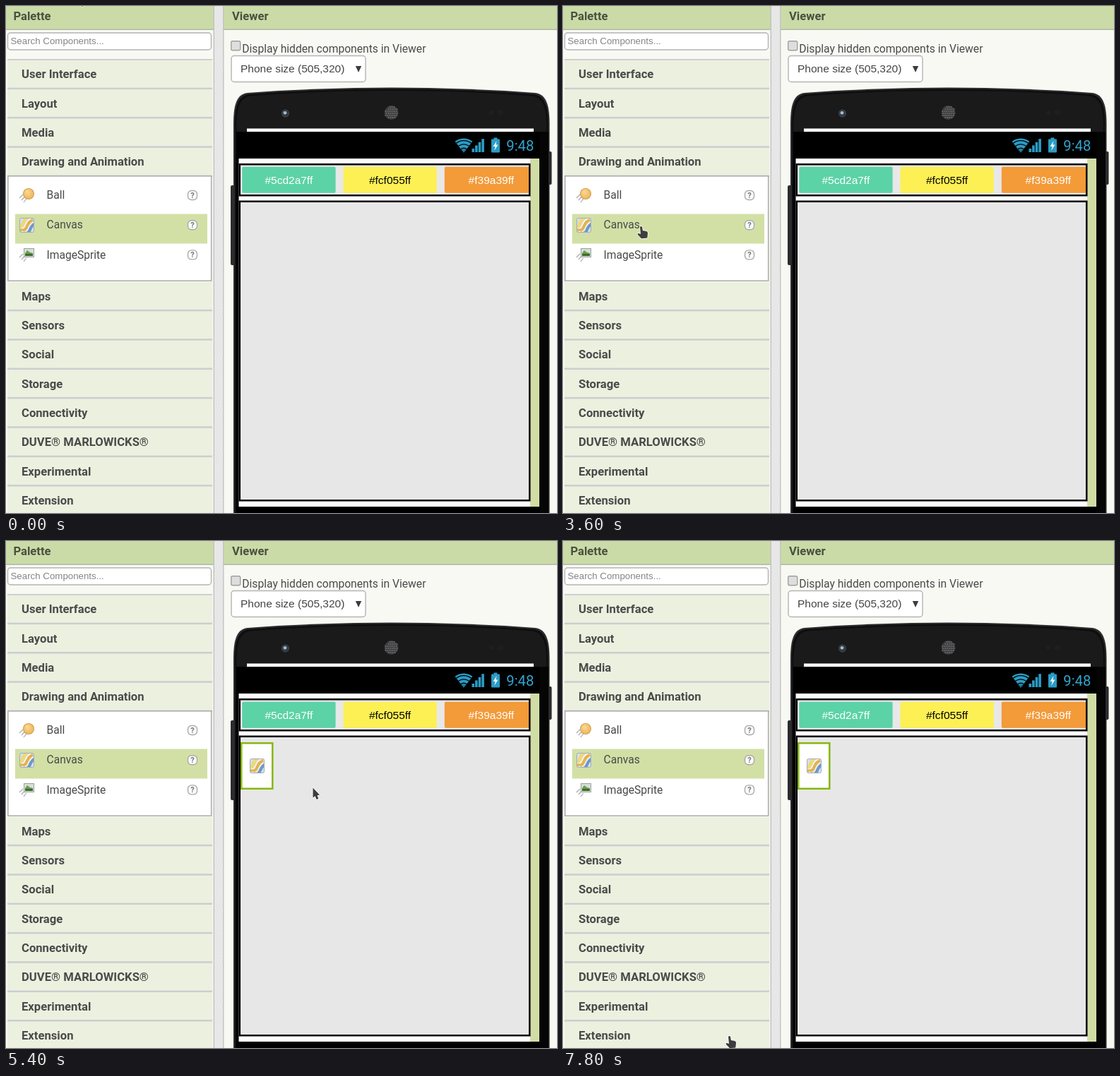
Recreate the animation shown at these times as an HTML page with a canvas. Size 780 px wide and 718 px high, loop 8000 ms.

```html
<!DOCTYPE html>
<html lang="en">
<head>
<meta charset="utf-8">
<title>Designer: adding a canvas</title>
<style>
html, body { margin: 0; width: 780px; height: 718px; overflow: hidden; background: #f8f9f3; }
canvas { display: block; }
</style>
</head>
<body>
<canvas id="stage" width="780" height="718"></canvas>
<script>
const W = 780, H = 718, LOOP = 8000;
const ROBOTO = 'Roboto, sans-serif', ARIAL = '"Liberation Sans", Arial, sans-serif';
const stage = document.getElementById('stage').getContext('2d');
const backdrop = document.createElement('canvas');
backdrop.width = W;
backdrop.height = H;
let g = backdrop.getContext('2d');

function rect(x, y, w, h, color) {
  g.fillStyle = color;
  g.fillRect(x, y, w, h);
}

// Box given by its outer edge, with the border drawn inside
function frame(x, y, w, h, line, border, fill) {
  rect(x, y, w, h, border);
  rect(x + line, y + line, w - 2 * line, h - 2 * line, fill);
}

function rounded(x, y, w, h, r, fill, border, line = 1) {
  g.beginPath();
  g.roundRect(x, y, w, h, r);
  g.fillStyle = fill;
  g.fill();
  if (border) {
    g.strokeStyle = border;
    g.lineWidth = line;
    g.stroke();
  }
}

function label(str, x, y, font, color, align = 'left') {
  g.font = font;
  g.fillStyle = color;
  g.textAlign = align;
  g.textBaseline = 'alphabetic';
  g.fillText(str, x, y);
}

function disc(x, y, r, color) {
  g.beginPath();
  g.arc(x, y, r, 0, Math.PI * 2);
  g.fillStyle = color;
  g.fill();
}

function poly(points, fill) {
  g.beginPath();
  points.forEach(([x, y]) => g.lineTo(x, y));
  g.closePath();
  g.fillStyle = fill;
  g.fill();
}

function line(x1, y1, x2, y2, color, width) {
  g.beginPath();
  g.moveTo(x1, y1);
  g.lineTo(x2, y2);
  g.strokeStyle = color;
  g.lineWidth = width;
  g.stroke();
}

function canvasIcon(x, y) {
  g.save();
  g.translate(x, y);
  g.beginPath();
  g.roundRect(0.5, 0.5, 20, 20, 2);
  g.fillStyle = '#d3dfec';
  g.fill();
  g.clip();
  const ribbon = (color, width, shift) => {
    g.beginPath();
    g.moveTo(-3 + shift, 13 + shift);
    g.bezierCurveTo(10 + shift, 16 + shift, 3 + shift, 3 + shift, 15 + shift, -1 + shift);
    g.strokeStyle = color;
    g.lineWidth = width;
    g.stroke();
  };
  ribbon('#f0d878', 5, -1);
  ribbon('#f7f7f4', 2, 2);
  ribbon('#e6b24c', 4, 4);
  ribbon('#f3efe2', 1.5, 6.2);
  ribbon('#6c97c9', 4, 8.5);
  g.restore();
  g.beginPath();
  g.roundRect(x + 0.5, y + 0.5, 20, 20, 2);
  g.strokeStyle = '#a3adb5';
  g.lineWidth = 1;
  g.stroke();
}

function speedLines(x, y) {
  for (let i = 0; i < 3; i++) line(x + i * 3, y + i * 3, x + 5 + i * 2.4, y - 5 + i * 3, '#aaa', 1.2);
}

function ballIcon() {
  speedLines(19, 272);
  const shade = g.createRadialGradient(30, 263, 1, 32, 266, 9);
  shade.addColorStop(0, '#fbd792');
  shade.addColorStop(1, '#ecb04f');
  disc(32, 266, 8, '#c99a50');
  disc(32, 266, 7.2, shade);
}

function spriteIcon() {
  speedLines(19, 356);
  frame(25, 343, 15, 13, 1, '#9aa29a', '#d5dfd8');
  poly([[27, 350], [30, 346], [34, 349], [38, 350], [38, 354], [27, 354]], '#6b9d4b');
  rect(27, 351, 11, 3, '#3f6a2c');
}

function helpIcon(y) {
  rounded(257.5, y - 6.5, 13, 13, 5, '#fbfbfb', '#aaa', 1.4);
  label('?', 264, y + 4, 'bold 11px ' + ROBOTO, '#777', 'center');
}

function palette() {
  rect(0, 0, 294, H, '#f8f9f3');
  rect(0, 0, 294, 33, '#cbdba7');
  rect(0, 32.6, 294, 1.4, '#b0b3a8');
  rect(293.5, 0, 1.5, H, '#c4c4c4');
  label('Palette', 10.4, 19.5, 'bold 16.6px ' + ROBOTO, '#4b5040');
  rounded(2.5, 38, 288, 24, 4, '#fff', '#b4b4b4', 1.4);
  label('Search Components...', 6.5, 54, '13.3px ' + ARIAL, '#858585');

  rect(2, 75, 290, 2, '#cbcbcb');
  const row = (name, mid) => {
    rect(2, mid - 19.5, 290, 39, '#ecf0df');
    rect(2, mid + 19.3, 290, 3, '#cdcdcd');
    label(name, 22, mid + 6, 'bold 16.65px ' + ROBOTO, '#4a4a4a');
  };
  const pitch = 41.35;
  ['User Interface', 'Layout', 'Media', 'Drawing and Animation']
    .forEach((name, i) => row(name, 96.3 + i * pitch));
  ['Maps', 'Sensors', 'Social', 'Storage', 'Connectivity', 'DUVE® MARLOWICKS®', 'Experimental', 'Extension']
    .forEach((name, i) => row(name, 410.5 + i * pitch));

  frame(2, 240, 289.5, 150, 1.6, '#aeaeae', '#fff');
  rect(13, 294.5, 272, 42, '#d2e0a6');
  ['Ball', 'Canvas', 'ImageSprite'].forEach((name, i) => {
    const mid = 268 + i * 42.2;
    label(name, 57.5, mid + 5.2, '15.6px ' + ROBOTO, '#494949');
    helpIcon(mid);
  });
  ballIcon();
  canvasIcon(19, 300);
  spriteIcon();
}

function divider() {
  rect(295, 0, 12, H, '#e9e9e9');
  for (let y = 0; y < H; y += 2)
    for (let x = 295; x < 307; x += 2)
      if ((x * 3 + y * 5 + (y >> 2)) % 4 < 2) rect(x, y, 1, 1, '#d9d9d9');
}

function phoneBody() {
  rounded(318, 254, 6, 113, 2, '#2b2b2d');
  rounded(766, 206, 6.5, 47, 2, '#2b2b2d');
  const outline = inset => {
    const l = 322 + inset, r = 769.5 - inset, t = inset;
    g.beginPath();
    g.moveTo(l, H + 5);
    g.lineTo(l, 168);
    g.bezierCurveTo(l, 143 + t, 325 + t, 125 + t, 342 + t, 123 + t);
    g.quadraticCurveTo(440, 115.5 + t, 546, 115.5 + t);
    g.quadraticCurveTo(652, 115.5 + t, 749 - t, 123 + t);
    g.bezierCurveTo(766 - t, 125 + t, r, 143 + t, r, 168);
    g.lineTo(r, H + 5);
    g.closePath();
  };
  outline(0);
  g.fillStyle = '#2c2c2e';
  g.fill();
  outline(2);
  g.fillStyle = '#0e0e0f';
  g.fill();
  outline(4.5);
  g.fillStyle = '#1a1a1b';
  g.fill();

  disc(395.5, 152, 5.5, '#3d4348');
  disc(395.5, 152, 4, '#2c3842');
  disc(395, 151.3, 2.4, '#a3b9ca');
  disc(545.5, 151, 10, '#3c3c3e');
  for (let y = -8; y <= 8; y += 3)
    for (let x = -8; x <= 8; x += 3)
      if (x * x + y * y < 85) disc(545.5 + x + (y & 1), 151 + y, 1.1, '#6c6c6e');
  disc(687, 151, 3, '#211e20');
  disc(700, 151, 4, '#201d20');

  rect(341, 173.5, 406, 4.7, '#fff');
  rect(326, 178.2, 429.5, H, '#000');
  rect(755, 178.2, 13, H, '#050505');
}

function statusBar() {
  const blue = '#2b9cc4';
  g.save();
  poly([[648, 207.5], [635, 191], [635, 185], [661, 185], [661, 191]], '#000');
  g.clip();
  disc(648, 207.5, 20, blue);
  [17.5, 12.2, 7].forEach((r, i) => {
    disc(648, 207.5, r, '#000');
    disc(648, 207.5, r - 1.2, i < 2 ? blue : '#1f7fa4');
  });
  g.restore();
  for (let i = 0; i < 4; i++) rect(659.5 + i * 4.6, 202 - i * 4.6, 3.6, 5 + i * 4.6, blue);
  rect(690.5, 186.5, 5, 3, blue);
  rounded(687, 188.5, 12, 19, 1, blue);
  poly([[694.5, 191], [689.5, 199], [692.6, 199], [691.2, 205], [696.6, 196.5], [693.5, 196.5]], '#e8f5fa');
  label('9:48', 708.3, 204.5, '20.3px ' + ROBOTO, '#30a4cd');
}

function viewer() {
  rect(307, 0, W, H, '#f8f9f3');
  rect(307, 0, W, 33, '#cbdba7');
  rect(307, 32.6, W, 1.4, '#b0b3a8');
  rect(307, 0, 1.5, H, '#c4c4c4');
  label('Viewer', 320, 19.5, 'bold 16.6px ' + ROBOTO, '#4b5040');

  rounded(318.7, 49.7, 13, 13, 2, '#dedede', '#a0a0a0', 1.4);
  label('Display hidden components in Viewer', 334.3, 65.5, '15.65px ' + ROBOTO, '#4a4a4a');
  rounded(319, 70.5, 190, 37, 4, '#fff', '#b4b4b4', 1.4);
  label('Phone size (505,320)', 332, 94, '15.5px ' + ARIAL, '#444');
  poly([[494.8, 85], [503.2, 85], [499, 94]], '#3c3c3c');

  phoneBody();
  statusBar();
  rect(329.5, 216, 413, 493, '#fff');
  rect(742, 216, 13, 493, '#d1dda5');
  frame(329.5, 223, 413, 46.5, 2.5, '#000', '#e8e8e8');
  frame(329.5, 275.5, 413, 426, 2.5, '#000', '#e7e7e7');
  [['#5cd2a7', '#fff', 334.3], ['#fcf055', '#000', 477.5], ['#f39a39', '#fff', 620.8]].forEach(([fill, ink, x]) => {
    g.save();
    g.beginPath();
    g.rect(332, 226, 408, 41);
    g.clip();
    rounded(x, 227.7, 132.3, 37, 2, fill);
    label(fill + 'ff', x + 66, 251.5, '15.5px ' + ARIAL, ink, 'center');
    g.restore();
  });
}

function pointer(shape, x, y) {
  g.save();
  g.translate(x, y);
  g.lineJoin = 'round';
  g.beginPath();
  if (shape === 'arrow') {
    [[0.5, 0.5], [0.5, 14.5], [3.6, 12.2], [5.6, 17], [8.4, 15.8], [6.4, 11.2], [10, 10.4]]
      .forEach(p => g.lineTo(...p));
  } else {
    g.moveTo(4, 2);
    g.quadraticCurveTo(5.5, 0, 7, 2);
    g.lineTo(7.8, 7);
    g.lineTo(13, 8);
    g.quadraticCurveTo(15.2, 8.6, 15, 11);
    g.lineTo(14.3, 17.6);
    g.lineTo(6, 18.2);
    g.lineTo(1, 13);
    g.quadraticCurveTo(0, 11, 2, 11);
    g.lineTo(5, 12);
  }
  g.closePath();
  g.strokeStyle = 'rgba(255,255,255,0.75)';
  g.lineWidth = 1.8;
  g.stroke();
  g.fillStyle = '#3d3d3f';
  g.fill();
  g.restore();
}

// Each stop holds until the next one
const stops = [
  [0, 'arrow', 102, -16], [100, 'arrow', 102, -14],
  [1100, 'hand', 162, 219], [1500, 'hand', 163, 219], [3600, 'hand', 105, 311],
  [4400, 'arrow', 225, 336], [4500, 'arrow', 363, 352], [4700, 'arrow', 427, 352],
  [4900, 'arrow', 434, 349], [6400, 'arrow', 429, 351], [6800, 'arrow', 424, 350],
  [7100, 'arrow', 425, 336], [7300, 'arrow', 424, 334],
  [7500, 'arrow', 296, 594], [7800, 'hand', 230, 700]
];

function pointerAt(t) {
  if (t >= 300 && t < 1100) {
    const p = (Math.floor(t / 100) - 2) / 8;
    const ease = p * p * (3 - 2 * p);
    const y = -14 + 234 * ease;
    return [y > 76 ? 'hand' : 'arrow', 102 + 64 * ease, y];
  }
  return stops.filter(s => s[0] <= t).pop().slice(1);
}

function draw(t) {
  g.drawImage(backdrop, 0, 0);
  if (t >= 4700 && t < 5400) rect(332, 278, 408, 2, '#0000ff');
  if (t >= 4500 && t < 5400) {
    const [x, y] = t < 4700 ? [291, 320] : t < 4900 ? [402, 323] : [415, 320];
    frame(x, y, 46, 67, 2.5, '#000', '#fff');
  }
  if (t >= 5400) {
    frame(332, 285, 46.5, 67, 2.5, '#88b70f', '#fff');
    canvasIcon(345, 308);
  }
  if (t >= 7100 && t < 7800) {
    frame(432.5, 362.5, 80, 25.5, 1, '#66717d', '#525961');
    label('vaSplash', 439.5, 380, '14.5px "DejaVu Sans", sans-serif', '#cfd4da');
  }
  pointer(...pointerAt(t));
}

divider();
palette();
viewer();
g = stage;

let start;
function tick(now) {
  start ??= now;
  draw((now - start) % LOOP);
  requestAnimationFrame(tick);
}
draw(0);
requestAnimationFrame(tick);
</script>
</body>
</html>
```
